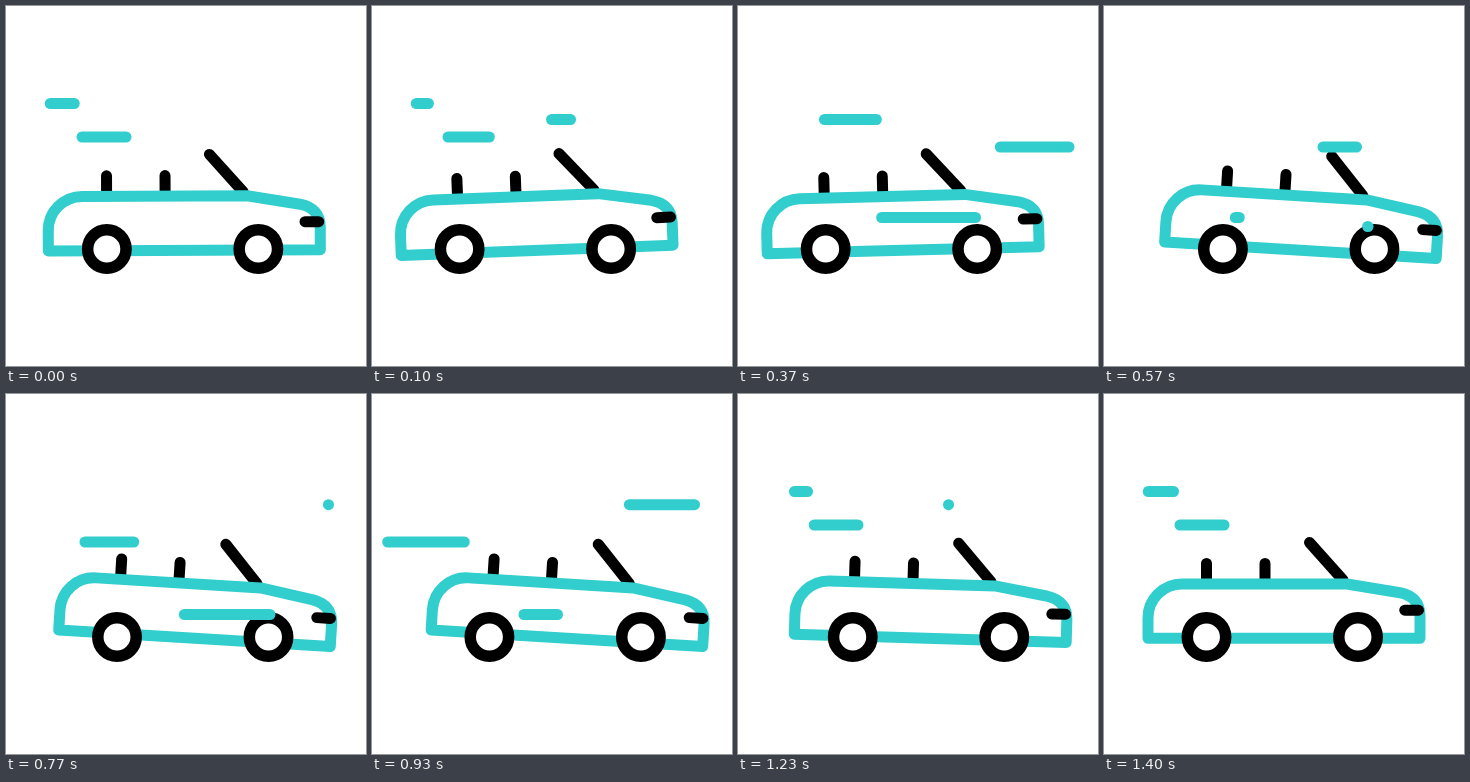
Recreate the animation shown at these times as an HTML page. Size 360 px wide and 360 px high, loop 1.67 s.

```html
<!DOCTYPE html>
<html lang="en">
<head>
<meta charset="utf-8">
<title>Convertible</title>
<style>
  html, body { margin: 0; width: 100%; height: 100%; overflow: hidden; background: #fff; }
  svg { display: block; width: 100vw; height: 100vh; }
  path, line, circle { fill: none; stroke: #000; stroke-width: 11; stroke-linecap: round; stroke-linejoin: round; }
  .teal, #streaks line { stroke: #32cdcd; }
  #wheels circle { fill: #fff; stroke-width: 11.5; }
</style>
</head>
<body>
<svg viewBox="0 0 360 360">
  <g id="car">
    <g id="body">
      <path d="M102.5 169.5V187M161 169.5V187M205.5 148.5L239 186"/>
      <path class="teal" d="M44 244.3V224A34 34 0 0 1 78 190H243L296 198.7Q316 203 316 222V244.3Z"/>
      <path d="M300.8 216.2H314.5"/>
    </g>
    <g id="wheels">
      <circle cx="102.5" cy="243" r="19.2"/>
      <circle cx="254" cy="243" r="19.2"/>
    </g>
  </g>
  <g id="streaks"></g>
</svg>
<script>
// Times inside the loop are counted in steps of 1/30 s; the last step rests.
const LOOP = 1670, STEP = 100 / 3, LAST = 42, CYCLE = LAST + 1;
const DRAW = 9.2, ERASE = 8;

const byId = id => document.getElementById(id);
const car = byId('car'), body = byId('body');

function ease(p) {
  p = Math.min(1, Math.max(0, p));
  return p * p * (3 - 2 * p);
}

// A streak is drawn from its right end, then erased in the same direction.
function streak(right, y, start, length = 112, hold = 6.2) {
  const line = document.createElementNS('http://www.w3.org/2000/svg', 'line');
  line.setAttribute('y1', y);
  line.setAttribute('y2', y);
  byId('streaks').append(line);

  return step => {
    const age = (step - start + CYCLE) % CYCLE;
    line.setAttribute('x1', right - length * ease(age / DRAW));
    line.setAttribute('x2', right - length * ease((age - hold) / ERASE) + 0.01);
    line.setAttribute('visibility', age < hold + ERASE ? 'visible' : 'hidden');
  };
}

const streaks = [
  streak(198.5, 113.5, 0.6),
  streak(243.3, 211.5, 3.7),
  streak(331, 141, 5.7),
  streak(264, 220.5, 16.7),
  streak(127.7, 148, 18.8),
  streak(322.5, 110.7, 22.9),
  streak(120, 131, 28.2, 44, 16.6),
  streak(69.5, 97.5, 32.3, 25.2, 9.6)
];

function render(step) {
  const move = (by, from, to) => by * ease((step - from) / (to - from));

  // Brake and lean back, surge ahead, sway twice, settle.
  const shift = move(-28.7, -1.2, 7) + move(46.2, 7, 18) + move(-10.4, 18, 24.5)
    + move(17.4, 24.5, 32) + move(-24.5, 32, 42);
  const tilt = move(-4.2, -1.2, 7) + move(7.7, 7, 17) + move(-3.5, 32, 42);

  car.setAttribute('transform', `translate(${shift} 0)`);
  body.setAttribute('transform', `rotate(${tilt} 180 244)`);
  streaks.forEach(draw => draw(step));
}

function tick() {
  const t = performance.now() % LOOP;
  render(Math.min(LAST, Math.floor((t + 3.5) / STEP)));
  requestAnimationFrame(tick);
}
tick();
</script>
</body>
</html>
```
